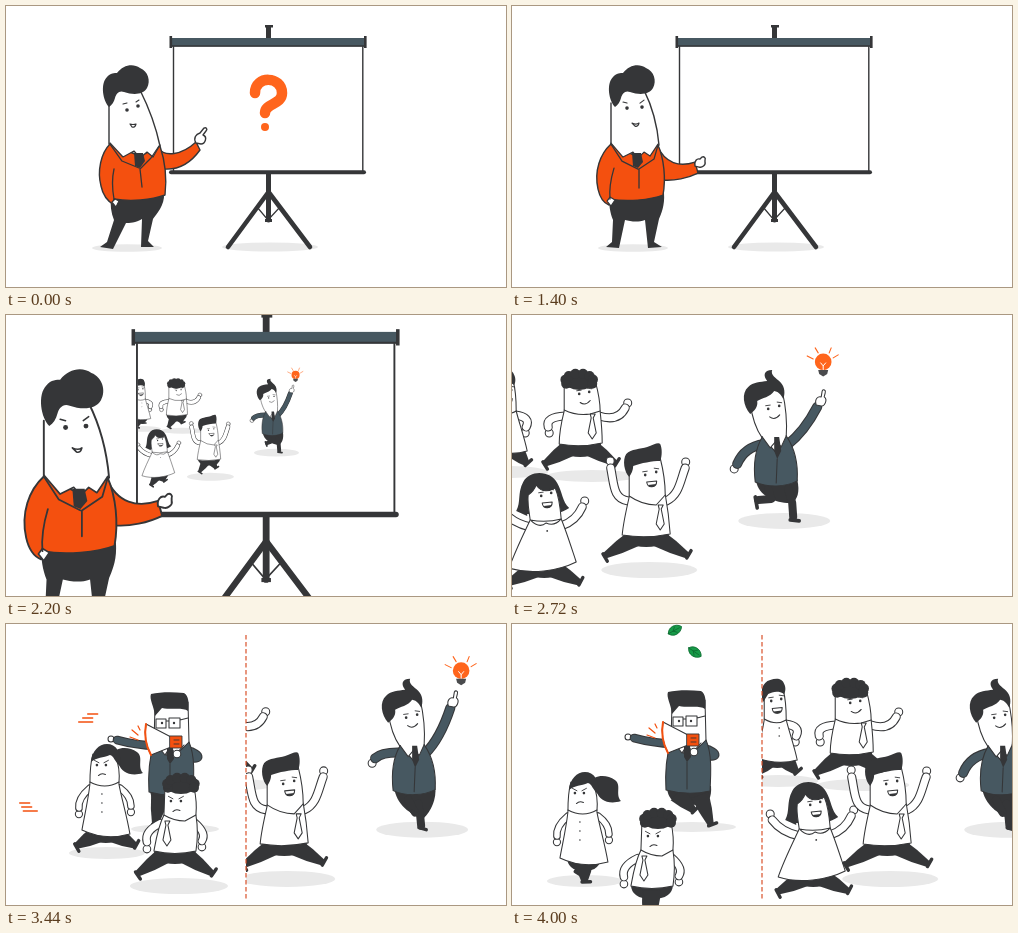
Recreate the animation shown at these times as an HTML page with a canvas. Size 500x281 px, loop 4040 ms.

```html
<!DOCTYPE html>
<html>
<head>
<meta charset="utf-8">
<style>
html, body { margin: 0; width: 100%; height: 100%; overflow: hidden; background: #fff; }
canvas { display: block; width: 500px; height: 281px; }
</style>
</head>
<body>
<canvas id="c"></canvas>
<script>
const LOOP = 4040, ZOOM = 2.78, THIN = 1.05;
const INK = '#353638', ORANGE = '#f4500f', BRIGHT = '#ff651c', SLATE = '#475861', SHADE = '#e9e9e9', WHITE = '#fff';
const cv = document.getElementById('c'), g = cv.getContext('2d');
const dpr = window.devicePixelRatio || 1;
cv.width = 500 * dpr;
cv.height = 281 * dpr;

const clamp = v => Math.max(0, Math.min(1, v));
const span = (t, a, b) => clamp((t - a) / (b - a));
const inOut = p => p < .5 ? 4 * p * p * p : 1 - Math.pow(2 - 2 * p, 3) / 2;
const NUM = /-?\d+(\.\d+)?/g;

// Blend two path strings that share one structure
function mix(a, b, p) {
  const n = b.match(NUM);
  let i = 0;
  return a.replace(NUM, v => +v + (n[i++] - v) * p);
}
function draw(d, fill, edge, w = THIN) {
  const p = new Path2D(d);
  if (fill) { g.fillStyle = fill; g.fill(p); }
  if (edge) { g.strokeStyle = edge; g.lineWidth = w; g.stroke(p); }
}
const line = (d, w = THIN, col = INK) => draw(d, null, col, w);
function oval(x, y, rx, ry, fill, edge) {
  g.beginPath();
  g.ellipse(x, y, rx, ry, 0, 0, 7);
  g.fillStyle = fill;
  g.fill();
  if (edge) { g.strokeStyle = INK; g.lineWidth = THIN; g.stroke(); }
}
function box(x, y, w, h, col) {
  g.fillStyle = col;
  g.fillRect(x, y, w, h);
}
function at(x, y, fn) {
  g.save();
  g.translate(x, y);
  fn();
  g.restore();
}
const shadow = (x, y, rx, ry) => oval(x, y, rx, ry, SHADE);
const fist = (x, y, r = 4) => oval(x, y, r, r, WHITE, true);
function tube(d, w, col = WHITE) {
  line(d, w + 2 * THIN);
  line(d, w, col);
}

// Eyes, brows and mouth from the two eye positions
function face(x1, y1, x2, y2, mood) {
  oval(x1, y1, 1.3, 1.4, INK);
  oval(x2, y2, 1.3, 1.4, INK);
  const mx = (x1 + x2) / 2 + 1, my = (y1 + y2) / 2 + 9.5, s = mood === 'mad' ? 1.2 : -.3;
  line(`M${x1 - 2.5} ${y1 - 3.5 - s} L${x1 + 2} ${y1 - 3.5 + s} M${x2 - 2} ${y2 - 3.5 + s} L${x2 + 2.5} ${y2 - 3.5 - s}`, .9);
  if (mood === 'open') {
    draw(`M${mx - 5} ${my - 1} L${mx + 5} ${my - 2} C${mx + 5} ${my + 5} ${mx - 4} ${my + 6} ${mx - 5} ${my - 1} Z`, WHITE, INK);
    draw(`M${mx - 3.5} ${my + 2} L${mx + 4.5} ${my + 1} C${mx + 3} ${my + 4.5} ${mx - 2} ${my + 5} ${mx - 3.5} ${my + 2} Z`, INK);
  } else if (mood === 'mad') {
    line(`M${mx - 4} ${my + 1} Q${mx - 1} ${my - 2} ${mx + 3} ${my}`);
  } else {
    line(`M${mx - 5} ${my} Q${mx} ${my + 4} ${mx + 5} ${my - 2}`);
  }
}

// Tapered leg with a shoe set square to it
function leg(hx, hy, fx, fy) {
  const len = Math.hypot(fx - hx, fy - hy), dx = (fx - hx) / len, dy = (fy - hy) / len;
  const pt = (k, n) => `${hx + (fx - hx) * k - dy * n} ${hy + (fy - hy) * k + dx * n}`;
  draw(`M${pt(0, 9)} Q${pt(.5, 7.5)} ${pt(1, 3)} L${pt(1, -3)} Q${pt(.5, -7.5)} ${pt(0, -9)} Z`, INK);
  line(`M${fx - dy * 2.5} ${fy + dx * 2.5} L${fx + dy * 6} ${fy - dx * 6}`, 3.4);
}
function legs(x, y, w, reach, drop, ph) {
  draw(`M${x - w} ${y - 2} L${x + w} ${y - 2} Q${x + w} ${y + 13} ${x} ${y + 13} Q${x - w} ${y + 13} ${x - w} ${y - 2} Z`, INK);
  for (const s of [-1, 1]) {
    const c = Math.cos(ph) * s, up = Math.max(0, Math.sin(ph) * s);
    leg(x + c * w * .5, y + 4, x + reach * c - up * 6, y + drop + (1 - Math.abs(c)) * 8 - up * 9);
  }
}
function curls(x, y) {
  oval(x, y, 15, 9, INK);
  for (let i = 0; i < 8; i++) {
    const a = Math.PI * (.88 + i * .177);
    oval(x + Math.cos(a) * 14, y + Math.sin(a) * 7.5, 5, 5, INK);
  }
}
const tie = (x, y) => draw(`M${x - 2} ${y} L${x + 3} ${y} L${x + 1} ${y + 4} L${x + 4} ${y + 19} L${x} ${y + 25} L${x - 4} ${y + 19} L${x - 1} ${y + 4} Z`, WHITE, INK);

function board() {
  shadow(264, 241, 48, 4.5);
  line('M262.5 186 L222 241 M262.5 186 L304 241', 4.6);
  line('M262.5 166 V214', 5);
  line('M251 201 L262 214 L274 201', 1.2);
  box(259, 213, 7, 3, INK);
  box(259, 19, 8, 2.5, INK);
  box(260, 20, 5, 13, INK);
  box(167, 39, 190, 126, WHITE);
  line('M167.5 39 V165 M356.8 39 V165', 1.4);
  box(165, 32, 194, 8.5, SLATE);
  line('M165 40 H359', 1.4);
  box(163.5, 30, 2.6, 12, INK);
  box(358, 30, 2.6, 12, INK);
  line('M165 166.3 H358', 4);
}

function question(k) {
  if (k <= 0) return;
  at(262, 97, () => {
    g.scale(k, k);
    g.translate(-262, -97);
    line('M249 87 C249 69 276 70 276 87 C276 99 259 97 259 107', 10.5, BRIGHT);
    oval(259, 121, 4, 4, BRIGHT);
  });
}

// Presenter: p goes from pointing to open hand
function presenter(p, bob) {
  const part = (a, b, fill, edge, w) => draw(mix(a, b, p), fill, edge, w);
  shadow(121, 242, 35, 3.8);
  part('M107 191 L158 187 C159 200 150 208 147 213 L142 235 L148 241 L135 241 L136 213 C130 217 123 217 120 217 L107 243 L94 241 L101 236 L108 214 C105 207 104 198 105 191 Z',
    'M98 192 L152 187 C153 200 149 208 147 213 L142 236 L150 241 L136 242 L133 214 C125 217 118 215 113 214 L107 242 L94 241 L100 236 L101 214 C98 207 97 198 97 192 Z', INK);
  g.save();
  g.translate(0, bob);
  part('M103 95 L103 138 L134 152 L154 140 C149 116 141 98 134 84',
    'M99 97 L99 138 L125 152 L147 139 C145 116 139 98 132 84', WHITE, INK, 1.4);
  part('M152 141 C158 152 176 149 190 136 L194 144 C184 158 172 164 158 163 Z',
    'M145 139 C153 158 168 161 183 156 L186 167 C176 172 162 175 151 174 Z', ORANGE, INK, 1.4);
  part('M190 137 C187 132 190 128 194 127 L198 122 C200 121 202 123 200 125 L197 129 C202 131 199 138 195 138 Z',
    'M183 160 C182 155 185 152 188 153 L190 151 C192 150 194 152 193 154 L193 156 C194 159 190 162 187 161 Z', WHITE, INK, 1.4);
  part('M104 138 C95 147 91 165 95 180 C97 190 103 196 108 199 L108 193 C125 196 145 194 159 189 C161 172 159 155 154 140 L134 150 Z',
    'M99 138 C88 148 82 165 86 183 C88 192 92 197 97 199 L98 193 C115 196 138 194 151 189 C154 172 152 153 146 139 L124 150 Z', ORANGE, INK, 1.4);
  part('M106 196 L109 193 L113 195 L110 201 Z', 'M95 195 L98 191 L103 194 L99 200 Z', WHITE, INK, 1.2);
  part('M108 163 C106 172 106 182 108 193', 'M102 162 C99 172 97 182 98 193', null, INK, 1.3);
  part('M104 137 L117 151 L128 145 L134 152 L141 146 L147 151 L154 139',
    'M99 137 L111 151 L121 146 L126 152 L132 146 L138 150 L146 138', WHITE, INK, 1.2);
  part('M128 147 L137 147 L139 155 L134 162 L129 160 Z', 'M120 147 L129 147 L131 156 L126 162 L121 160 Z', INK);
  part('M104 138 L116 155 L133 162 M153 140 L145 152 L134 163 L136 181',
    'M99 138 L110 155 L126 163 M146 139 L142 153 L127 163 L127 182', null, INK, 1.3);
  draw('M103 101 C97 95 94 78 101 71 C104 67 109 67 111 67 C117 59 127 57 134 62 C142 65 145 75 141 82 C137 89 127 89 118 86 C113 84 110 88 109 92 C108 96 106 99 103 101 Z', INK);
  oval(121 - 6 * p, 104 - 2 * p, 1.8, 1.8, INK);
  oval(132 - 2 * p, 100 + p, 1.8, 1.8, INK);
  part('M117 98 L121 97 M130 96 L133 94', 'M111 96 L115 97 M128 97 L132 94', null, INK, 1.1);
  part('M124 118 Q127 119 130 118 Q129 122 126 121 Z', 'M120 117 Q124 119 127 117 Q126 121 123 120 Z', WHITE, INK, 1.2);
  g.restore();
}

function bulb() {
  line('M295 41 L301 44 M303 33 L306 38 M319 33 L317 38 M326 40 L321 43', 1.1, BRIGHT);
  oval(311, 47, 8.3, 8.3, BRIGHT);
  line('M308.5 48 L311 51 L313.5 48 M311 51 V55', 1, WHITE);
  draw('M306 55 H316 L315 59 L311 61.5 L307 59 Z', '#4a4b4d');
}

function leader(t) {
  const u = .5 - .5 * Math.cos(2 * Math.PI * (t - 2720) / 288);
  const v = .5 - .5 * Math.cos(2 * Math.PI * (t - 2720) / 1280);
  shadow(272, 206, 46, 8);
  draw(mix('M244 166 L285 164 C288 178 285 184 280 188 C266 189 246 182 244 166 Z',
    'M244 164 L285 162 C287 176 280 188 274 194 C260 192 246 180 244 164 Z', u), INK);
  line(mix('M276 174 L280 188 L281 202', 'M268 180 L270 192 L271 202', u), 8);
  line(mix('M278 205 L287 206', 'M269 204 L276 206', u), 3.6);
  line(mix('M256 174 L259 184 L246 185', 'M258 176 L262 184 L265 189', u), 8);
  line(mix('M243 182 L245 193', 'M262 188 L267 191', u), 3.6);
  fist(222, 154 - 15 * v);
  tube(`M252 129 Q232 ${132 - 4 * v} 225 ${149 - 15 * v}`, 8, SLATE);
  tube(mix('M275 130 Q292 117 305 92', 'M275 130 Q290 115 300 84', v), 8, SLATE);
  at(-6 * v, -8 * v, () => draw('M304 90 C302 84 306 81 309 82 L310 76 C311 74 314 75 313 78 L312 82 C316 85 312 92 309 91 Z', WHITE, INK));
  draw('M238 88 C240 104 245 116 250 123 L264 138 L274 122 C275 108 274 93 270 76', WHITE, INK);
  draw('M250 122 C243 134 241 150 243 167 C256 173 274 172 285 166 C286 150 283 134 274 121 L265 139 Z', SLATE, INK);
  draw('M250 122 L258 133 L264 126 L269 132 L274 121', WHITE, INK);
  draw('M262 122 L267 122 L269 136 L265 144 L262 136 Z', INK);
  line('M265 144 L264 168');
  draw('M238 99 C231 91 229 78 236 72 C241 67 248 67 255 66 C251 61 251 55 260 55 C258 60 264 63 268 67 C273 72 273 79 271 84 C269 80 267 77 262 76 C258 82 250 83 245 86 C246 92 242 96 238 99 Z', INK);
  face(256, 94, 267, 91, 'smile');
  bulb();
}

function cheerer(ph) {
  shadow(137, 255, 48, 8);
  legs(134, 219, 23, 42, 22, ph);
  fist(98, 146);
  fist(173.5, 147);
  tube('M116 186 C101 184 102 170 98.5 153', 7);
  tube('M154 186 C167 180 168 166 173 153', 7);
  draw('M117 152 L117 182 C114 195 111 208 110 220 Q134 224 158 219 C157 205 155 190 153 179 C153 165 151 155 148 143', WHITE, INK);
  line('M117 181 Q130 190 144 190 L153 180');
  tie(148, 190);
  draw('M117 162 C112 157 110 145 114 139 C119 134 128 134 135 132 C141 130 146 127 148 129 C150 133 150 141 148 146 C140 146 129 148 121 151 C121 155 119 159 117 162 Z', INK);
  face(133, 160, 144, 157, 'open');
}

function jogger(ph) {
  shadow(80, 161, 46, 6);
  legs(68, 129, 21, 36, 20, ph);
  fist(37, 118);
  fist(115.5, 88);
  tube('M53 101 Q33 102 36 112', 7);
  tube('M87 101 Q106 107 113 93', 7);
  draw('M52 68 L52 96 C49 108 47 118 47 129 Q68 133 90 128 C90 117 89 106 88 97 C88 86 86 77 83 66', WHITE, INK);
  line('M52 95 Q64 101 78 99 L88 96');
  tie(80, 99);
  curls(67, 66);
  face(67, 79, 77, 77, 'smile');
}

function follower(ph) {
  shadow(-4, 157, 40, 6);
  legs(-5, 131, 15, 20, 18, ph);
  fist(13, 118);
  tube('M3 100 Q19 102 14 112', 7);
  draw('M-18 66 L-18 96 C-20 110 -24 122 -28 133 Q-5 142 15 136 C12 122 7 108 4 96 C4 86 4 77 1 66', WHITE, INK);
  line('M-18 95 Q-6 102 4 96');
  for (const y of [104, 112]) oval(-3, y, .8, .8, INK);
  draw('M-19 78 C-23 68 -20 58 -12 56 C-6 54 0 54 2 60 C4 64 3 68 2 70 C-4 66 -10 68 -14 70 Z', INK);
  face(-11, 77, -1, 75, 'open');
}

function runnerGirl(ph) {
  legs(32, 250, 19, 36, 18, ph);
  fist(-11, 190);
  fist(72.5, 186);
  tube('M18 212 Q0 208 -9 196', 7);
  tube('M49 211 Q64 206 70 192', 7);
  draw('M15 170 C3 168 10 190 6 197 C15 200 24 199 30 202 C41 200 49 198 57 193 C50 187 50 176 45 168 C39 156 18 154 11 167 C5 178 9 187 4 196 L15 201 Z', INK);
  draw('M16 180 C15 189 17 197 18 205 C10 222 2 238 -3 253 C18 260 46 256 64 247 C59 232 54 216 49 204 C48 192 47 182 43 173 C34 178 28 176 24 170 C22 175 19 178 16 180 Z', WHITE, INK);
  draw('M18 205 Q27 214 34 208 Q42 212 49 204 Q34 208 18 205 Z', WHITE, INK);
  oval(35, 216, .9, .9, INK);
  face(29, 181, 39, 178, 'open');
}

function crowd(t) {
  const ph = Math.PI * (t - 2720) / 142;
  const enter = -480 * Math.pow(1 - span(t, 1350, 2200), 4);
  const a = span(t, 2720, 3440), b = Math.max(0, t - 3440) / 560;
  const x = end => enter + 144 * a + end * b;
  const bob = d => -2 * Math.pow(Math.sin(ph + d), 2);
  at(x(126), bob(0), () => follower(ph));
  at(x(127), bob(.1), () => jogger(ph));
  at(x(82), bob(.2), () => leader(t));
  at(x(125), bob(.1), () => runnerGirl(ph));
  at(x(97), bob(0), () => cheerer(ph));
}

function boss(k) {
  shadow(168, 205, 44, 5);
  draw('M143 164 L187 164 C188 175 184 182 178 184 L152 180 C146 178 143 172 143 164 Z', INK);
  leg(153, 172, 148 + 22 * k, 201 - 12 * k);
  leg(176, 173, 187, 203);
  fist(104, 115, 3);
  tube('M150 122 Q128 121 110 116', 6.5, SLATE);
  tube('M184 128 Q200 136 176 133', 8, SLATE);
  draw('M148 82 L147 119 L164 134 L182 119 L181 78', WHITE, INK);
  draw('M147 118 C142 135 141 152 142 168 Q164 174 186 169 C187 150 188 132 182 118 L164 136 Z', SLATE, INK);
  draw('M150 121 L158 131 L163 123 L169 130 L177 121', WHITE, INK);
  draw('M160 124 L166 124 L167 135 L163 140 L160 135 Z', INK);
  line('M163 140 V167');
  draw('M148 92 C147 82 142 75 144 70 C153 68 166 68 177 69 C182 72 182 79 181 87 C176 83 165 86 155 84 Z', INK);
  line('M149 95 H159 V104 H149 Z M162 94 H173 V104 H162 Z M159 97 H162 M173 96 L181 94');
  oval(155, 99, 1.2, 1.2, INK);
  oval(167, 99, 1.2, 1.2, INK);
  line('M133 106 L131 102 M131 111 L125 106 M131 116 L123 113', 1.2, ORANGE);
  draw('M139 100 L164 113 L164 123 L144 131 C139 122 137 111 139 100 Z', WHITE, INK);
  line('M139 100 C137 111 139 122 144 131', 2, ORANGE);
  draw('M163 112 H175 V124 H163 Z', ORANGE, INK, .9);
  line('M167 116 H172 M167 120 H172', .9);
  fist(170, 130, 3.8);
}

function sulkyGirl(ph) {
  shadow(100, 229, 38, 6);
  legs(99, 206, 17, 30, 16, ph);
  fist(72, 190, 3.6);
  fist(124, 188, 3.6);
  tube('M83 164 Q71 174 72 184', 5.5);
  tube('M113 164 Q124 172 124 182', 5.5);
  draw('M105 132 C108 122 122 122 130 128 C137 133 130 142 136 149 C124 153 114 148 112 140 Z', INK);
  draw('M86 130 C83 140 83 150 83 160 C81 178 77 194 75 206 Q98 217 123 210 C120 192 115 176 112 160 C113 150 112 140 108 130', WHITE, INK);
  line('M83 158 Q98 166 112 158');
  for (const y of [170, 179, 188]) oval(95, y, .8, .8, INK);
  draw('M84 138 C85 127 92 120 100 120 C109 120 115 128 113 142 C108 138 107 132 103 131 C96 134 90 133 84 138 Z', INK);
  face(90, 141, 99, 141, 'mad');
}

function sulkyBoy(ph) {
  shadow(172, 262, 49, 8);
  legs(168, 227, 21, 38, 23, ph);
  fist(140, 225, 3.8);
  fist(195, 223, 3.8);
  tube('M154 199 Q137 207 140 218', 6.5);
  tube('M187 198 Q200 209 195 217', 6.5);
  draw('M158 163 L157 191 C151 203 149 216 147 227 Q168 232 189 227 C191 214 191 203 189 191 C190 181 189 172 187 163', WHITE, INK);
  line('M157 191 Q167 197 178 197 L189 191');
  tie(160, 197);
  curls(174, 161);
  face(164, 177, 174, 177, 'mad');
}

function dashes(x, y, step) {
  line(`M${x} ${y} h10 M${x + step} ${y + 4} h10 M${x + step * 1.8} ${y + 8} h14`, 1.4, ORANGE);
}
function leaf(x, y, a) {
  at(x, y, () => {
    g.rotate(a);
    draw('M-7.5 0 C-5 -6 4 -6 7.5 0 C4 6 -5 6 -7.5 0 Z', '#179a48', '#0e6e32', .8);
    line('M-7.5 0 L5 0 M-2 0 L1 -3 M-2 0 L1 3', .8, '#0e6e32');
  });
}

function leftPane(t) {
  if (t < 2860) return;
  const x = -5 + 255 * (1 - Math.pow(1 - span(t, 2860, 3740), 3));
  const k = Math.max(0, t - 3440) / 560, ph = Math.PI * (t - 3440) / 160;
  g.save();
  g.beginPath();
  g.rect(0, 0, x, 281);
  g.clip();
  box(0, 0, x, 281, WHITE);
  at(x - 239, 0, () => {
    const fly = -(t - 3440) * .3;
    dashes(81 + fly, 90, -5);
    dashes(13 + fly, 179, 2);
    at(k, -2 * k, () => boss(k));
    at(-38 * k, 28 * k, () => sulkyGirl(ph));
    at(-39 * k, 35 * k, () => sulkyBoy(ph));
  });
  const f = 4000 - t;
  leaf(163 + f * .05, 6 - f * .14, -.5 + f * .004);
  leaf(183 + f * .06, 28 - f * .15, .6 - f * .004);
  g.restore();
  g.setLineDash([4.5, 2.5]);
  g.lineCap = 'butt';
  line(`M${x} 11 V275`, 1.2, '#d9512a');
  g.setLineDash([]);
}

function render(now) {
  const t = now % LOOP;
  g.setTransform(dpr, 0, 0, dpr, 0, 0);
  g.lineCap = g.lineJoin = 'round';
  box(0, 0, 500, 281, WHITE);
  const k = 1 + (ZOOM - 1) * inOut(span(t, 1920, 2680));
  g.save();
  g.translate(269, 74);
  g.scale(k, k);
  g.translate(-269, -74);
  board();
  question(1 - inOut(span(t, 1120, 1340)));
  if (t > 1350) {
    g.save();
    g.beginPath();
    g.rect(168.2, 40.8, 188, 123.2);
    g.clip();
    g.translate(269, 74);
    g.scale(1 / ZOOM, 1 / ZOOM);
    g.translate(-269, -74);
    crowd(t);
    g.restore();
  }
  if (t < 2760) presenter(inOut(span(t, 1080, 1420)), .3 * Math.sin(t * Math.PI / 480));
  g.restore();
  leftPane(t);
}

const start = performance.now();
function tick() {
  render(performance.now() - start);
  requestAnimationFrame(tick);
}
tick();
</script>
</body>
</html>
```
